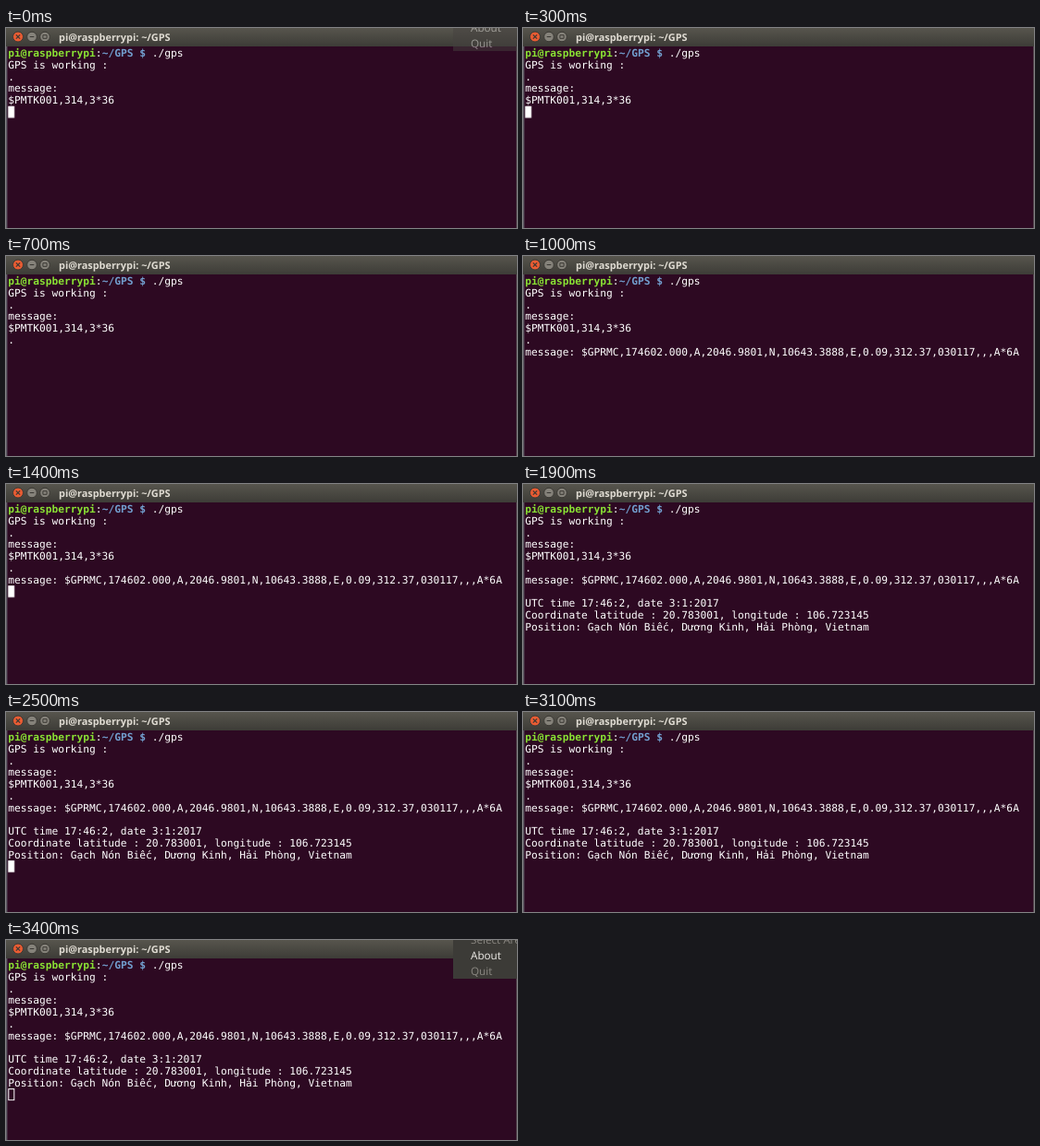
An HTML page for the animation above (3500 ms loop, 552 by 217 pixels).

```html
<!DOCTYPE html>
<html lang="en">
<head>
<meta charset="utf-8">
<title>Terminal</title>
<style>
  html, body { margin: 0; width: 100%; height: 100%; overflow: hidden; background: #2d0922; }
  svg { display: block; width: 100vw; height: 100vh; }
  text { white-space: pre; text-rendering: geometricPrecision; }
  #term text { font: 11.23px "DejaVu Sans Mono", monospace; fill: #fff; }
  #term .user { font-weight: bold; fill: #8ae234; }
  #term .path { font-weight: bold; fill: #729fcf; }
  .title { font: 700 10.9px "Open Sans", sans-serif; fill: #dfdbd2; }
  .menu text { font: 11.7px "Open Sans", sans-serif; fill: #f2f0ec; }
  .menu .off { fill: #8b8882; }
</style>
</head>
<body>
<svg viewBox="0 0 552 217">
  <defs>
    <linearGradient id="bar" x2="0" y2="1">
      <stop stop-color="#57554d"/>
      <stop offset="1" stop-color="#3d3c37"/>
    </linearGradient>
  </defs>
  <rect width="552" height="217" fill="#2d0922"/>
  <rect width="1.4" height="217" fill="#5f5c66"/>
  <rect x="551" width="1" height="217" fill="#50434a"/>
  <rect width="552" height="20" fill="url(#bar)"/>

  <g fill="none" stroke="#3a3833">
    <circle cx="13" cy="9.5" r="5.5" fill="#ea5c33"/>
    <path d="M10.8 7.3l4.4 4.4m0-4.4l-4.4 4.4" stroke-width="1.2"/>
    <circle cx="28" cy="9.5" r="5.3" fill="#85827a"/>
    <path d="M25.7 9.5h4.6"/>
    <circle cx="42" cy="9.5" r="5.3" fill="#85827a"/>
    <path d="M39.9 7.7h4.2v3.6h-4.2z"/>
  </g>
  <text class="title" x="57" y="13.7">pi@raspberrypi: ~/GPS</text>

  <g id="term">
    <g id="cursor">
      <rect id="block" width="6.8" height="12.7" fill="#fff"/>
      <rect id="hollow" x=".5" y=".5" width="6" height="12" fill="none" stroke="#fff"/>
    </g>
  </g>

  <g class="menu" id="closing">
    <rect x="483" width="69" height="25" fill="#45413f"/>
    <text x="502" y="4">About</text>
    <text x="502" y="21">Quit</text>
  </g>
  <g class="menu" id="opening">
    <rect x="483" width="69" height="42" fill="#3c3b37"/>
    <text class="off" x="502" y="4">Select Area</text>
    <text x="502" y="21">About</text>
    <text class="off" x="502" y="38">Quit</text>
  </g>
</svg>
<script>
const LOOP = 3500, LEFT = 2.3, TOP = 21.1, CELL = 6.76, ROW = 12.73, ASCENT = 10.2;
const $ = id => document.getElementById(id);

// Holds each [time, value] step until the next one.
function hold(el, prop, steps) {
  const frames = steps.map(([t, v]) => ({ offset: t / LOOP, [prop]: v, easing: "step-end" }));
  frames.push({ offset: 1, [prop]: steps[steps.length - 1][1] });
  el.animate(frames, { duration: LOOP, iterations: Infinity });
}

const cell = (col, row) => `translate(${LEFT + col * CELL}px, ${TOP + row * ROW}px)`;

// [row, time it is printed, text]
const lines = [
  [0, 0, '<tspan class="user">pi@raspberrypi</tspan>:<tspan class="path">~/GPS $</tspan> ./gps'],
  [1, 0, "GPS is working :"],
  [2, 0, "."],
  [3, 0, "message:"],
  [4, 0, "$PMTK001,314,3*36"],
  [5, 500, "."],
  [6, 1000, "message: $GPRMC,174602.000,A,2046.9801,N,10643.3888,E,0.09,312.37,030117,,,A*6A"],
  [8, 1700, "UTC time 17:46:2, date 3:1:2017"],
  [9, 1700, "Coordinate latitude : 20.783001, longitude : 106.723145"],
  [10, 1700, "Position: Gạch Nón Biếc, Dương Kinh, Hải Phòng, Vietnam"]
];

for (const [row, time, markup] of lines) {
  const line = document.createElementNS("http://www.w3.org/2000/svg", "text");
  line.setAttribute("x", LEFT);
  line.setAttribute("y", TOP + row * ROW + ASCENT);
  line.innerHTML = markup;
  $("term").append(line);
  if (time) hold(line, "opacity", [[0, 0], [time, 1]]);
}

hold($("cursor"), "transform", [[0, cell(0, 5)], [500, cell(1, 5)], [1000, cell(0, 7)], [1700, cell(0, 11)]]);
hold($("block"), "opacity", [[0, 1], [700, 0], [1300, 1], [1900, 0], [2500, 1], [3100, 0]]);
hold($("hollow"), "opacity", [[0, 0], [3200, 1]]);
hold($("closing"), "opacity", [[0, .5], [100, .3], [200, .12], [300, 0]]);
hold($("opening"), "opacity", [[0, 0], [3200, .35], [3300, .75], [3400, 1]]);
</script>
</body>
</html>
```
